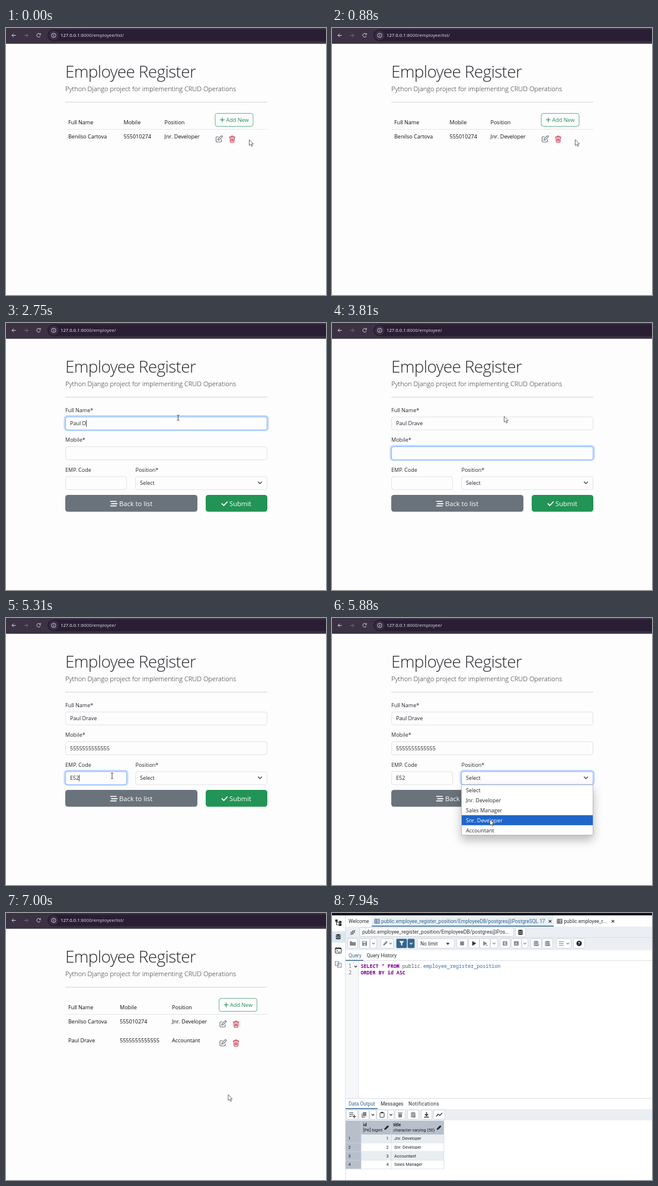
An HTML page for the animation above (8000 ms loop, 540 by 452 pixels).

```html
<!DOCTYPE html>
<html lang="en">
<head>
<meta charset="utf-8">
<title>Employee Register</title>
<style>
html, body { margin: 0; width: 100%; height: 100%; overflow: hidden; background: #fefdfe }
svg { display: block; width: 540px; height: 452px; white-space: pre }
.ui { font-family: "Open Sans", "Noto Sans", sans-serif }
.db { font-family: Roboto, "Liberation Sans", sans-serif }
.code { font-family: "Noto Sans Mono", "DejaVu Sans Mono", monospace }
.menu { filter: drop-shadow(0 8px 8px #0004) }
</style>
</head>
<body>
<svg id="stage" viewBox="0 0 540 452"></svg>
<script>
const LOOP = 8000;
const FORM_AT = 1440, LIST_AT = 6800, DB_AT = 7940;
const OPEN_AT = 5600, PICK_AT = 6310;
const INK = '#24272b', BLACK = '#0c0d0f', GREEN = '#229455', GREY = '#6a737b', BLUE = '#326690';
const NAME = 'Paul Drave', PHONE = '5555555555555';
const OPTIONS = ['Select', 'Jnr. Developer', 'Sales Manager', 'Snr. Developer', 'Accountant'];

// Pointer hot spot: time, x, y
const POINTER = [
  [0, 410.5, 189], [880, 410.5, 189], [1200, 388, 161], [1600, 388, 161],
  [2100, 290.5, 166], [2500, 290.5, 166], [2900, 290.5, 158], [4050, 290.5, 158],
  [4540, 179, 267], [5330, 179, 267], [5560, 262, 271], [5640, 262, 271],
  [5850, 266.5, 341], [5960, 266.5, 341], [6140, 266, 359], [6340, 266, 359],
  [6640, 375, 307.5], [7300, 375, 307.5], [7880, 360, 393], [8000, 360, 393]
];

// Text fields: box, label, value, focus span, first key and key interval
const FIELDS = [
  { x: 100, y: 158.5, w: 341, label: 'Full Name*', value: NAME, on: 2200, off: 3250, key: 2330, step: 80 },
  { x: 100, y: 209, w: 341, label: 'Mobile*', value: PHONE, on: 3250, off: 4580, key: 3930, step: 38 },
  { x: 100, y: 259.5, w: 104, label: 'EMP. Code', value: 'E52', on: 4580, off: OPEN_AT, key: 4820, step: 160 }
];

const stage = document.getElementById('stage');
const ruler = document.createElement('canvas').getContext('2d');
ruler.font = '9px "Open Sans", "Noto Sans", sans-serif';

const clamp = (v, a, b) => Math.min(b, Math.max(a, v));
const rect = (x, y, w, h, fill, more = '') =>
  `<rect x="${x}" y="${y}" width="${w}" height="${h}" fill="${fill}" ${more}/>`;
const text = (x, y, s, size = 9, fill = INK, more = '') =>
  `<text x="${x}" y="${y}" font-size="${size}" fill="${fill}" ${more}>${s}</text>`;
const line = (d, color, width = 1, more = '') =>
  `<path d="${d}" fill="none" stroke="${color}" stroke-width="${width}" ${more}/>`;
const shape = (d, fill) => `<path d="${d}" fill="${fill}"/>`;
const at = (x, y, s) => `<g transform="translate(${x} ${y})">${s}</g>`;
const group = (cls, s) => `<g class="${cls}">${s}</g>`;
const ROUND = 'stroke-linecap="round" stroke-linejoin="round"';

function pointerAt(t) {
  const i = POINTER.findIndex(p => p[0] > t);
  const [t0, x0, y0] = POINTER[i - 1], [t1, x1, y1] = POINTER[i];
  const u = (t - t0) / (t1 - t0), k = u * u * (3 - 2 * u);
  return { x: x0 + (x1 - x0) * k, y: y0 + (y1 - y0) * k };
}
const inside = (p, x, y, w, h) => p.x >= x && p.x <= x + w && p.y >= y && p.y <= y + h;

function drawPointer(p, kind) {
  const kinds = {
    arrow: '<path d="M0 0v10l2.3-2.1 1.7 3.5 1.5-.7-1.6-3.4h3.1z" fill="#fff" stroke="#3a3a3a" stroke-width=".75"/>',
    beam: line('M-2-4.5H-.5L0-4 .5-4.5H2M0-4V4M-2 4.5H-.5L0 4 .5 4.5H2', '#333', .9),
    hand: '<path d="M-1 0q1-1 2 0v4l4 1q1 .4 1 1.6l-.8 4.4h-5L-3.5 7q0-1.4 1.2-1L-1 7z" fill="#fff" stroke="#3a3a3a" stroke-width=".75"/>'
  };
  return at(p.x.toFixed(2), p.y.toFixed(2), kinds[kind]);
}

function browser(path) {
  return rect(0, 0, 540, 452, '#fefdfe') + rect(0, 0, 540, 26.7, '#3b3243') +
    rect(70, 2.5, 490, 20, '#291e34', 'rx="10"') +
    line('M16.5 12.5H10M13 9.5L10 12.5 13 15.5', '#d9d5dd') +
    line('M30.5 12.5H37M34 9.5l3 3-3 3', '#766e7d') +
    line('M57.6 10.5a3.1 3.1 0 1 0 .4 2.8M58.2 8.8v2.3H56', '#d9d5dd') +
    '<circle cx="80.5" cy="12.5" r="8" fill="#3a3045"/>' +
    '<circle cx="80.5" cy="12.5" r="3.6" fill="none" stroke="#dcd8e0" stroke-width=".9"/>' +
    line('M80.5 12v2.4M80.5 10.3v1', '#dcd8e0', .9) +
    text(92, 15.3, `127.0.0.1<tspan fill="#dedae2">:8000${path}</tspan>`, 7.75, '#fff') +
    text(100, 84, 'Employee Register', 28, INK, 'font-weight="300" letter-spacing="-.67"') +
    text(100, 107, 'Python Django project for implementing CRUD Operations', 11.05, INK, 'font-weight="300"') +
    rect(100, 125, 341, 1, '#d0d0d3');
}

function listPage(rows, [mobileX, positionX, addX], p) {
  const hot = inside(p, addX, 144, 65, 22);
  const ink = hot ? '#fff' : '#2b8a5c';
  let s = browser('/employee/list/') +
    text(105, 163, 'Full Name', 9, BLACK) + text(mobileX, 163, 'Mobile', 9, BLACK) +
    text(positionX, 163, 'Position', 9, BLACK) +
    rect(100, 171, 341, 1, '#e4e6e9') +
    rect(addX + .5, 144.5, 64, 22, hot ? GREEN : 'none', `rx="3.5" stroke="${GREEN}" stroke-width=".7"`) +
    line(`M${addX + 9} 155.5h7m-3.5-3.5v7`, ink, 1.2, ROUND) +
    text(addX + 19, 159, 'Add New', 9.1, ink);
  rows.forEach(([name, phone, job], i) => {
    const y = 187 + i * 32;
    s += text(105, y, name, 9, BLACK) + text(mobileX, y, phone, 9, BLACK) + text(positionX, y, job, 9, BLACK) +
      at(addX + 1, y - 5,
        line('M5 2H2.5Q1 2 1 3.5v6Q1 11 2.5 11h6q1.5 0 1.5-1.5V7M4 8l.6-2.3L9.6.7q.9-.7 1.7 0 .8.9.1 1.7L6.4 7.4z', GREY, 1.2, ROUND)) +
      at(addX + .4, y - 5,
        line('M24 2.6h9.6M26.6 2.4L27.5.8h2.6l.9 1.6M25 3l.5 7.5q.1 1.2 1.3 1.2h4q1.2 0 1.3-1.2L32.6 3M27.2 5v4.6M28.8 5v4.6M30.4 5v4.6', '#c93a50', 1.1, ROUND));
  });
  return s;
}

const glow = (x, y, w, k) => k <= 0 ? '' :
  rect(x, y, w, 22, 'none', `rx="3.5" stroke="#0d6efd" stroke-opacity="${.25 * k}" stroke-width="5"`);
const box = (x, y, w, k) => glow(x, y, w, k) +
  rect(x + .5, y + .5, w - 1, 22, '#fefdfe', `rx="3.5" stroke="${k > 0 ? '#86b7fe' : '#dfe2e6'}"`);

function field(f, t) {
  const count = clamp(Math.floor((t - f.key) / f.step) + 1, 0, f.value.length);
  const focused = t >= f.on && t < f.off;
  const typed = f.value.slice(0, count);
  const k = focused ? clamp((t - f.on) / 150, 0, 1) : 0;
  const last = count ? f.key + (count - 1) * f.step : f.on;
  let s = text(f.x, f.y - 8, f.label) + box(f.x, f.y, f.w, k) + text(f.x + 8, f.y + 14.5, typed);
  if (focused && (t - last) % 1060 < 530)
    s += rect(f.x + 8 + ruler.measureText(typed).width, f.y + 6, .8, 11, '#222');
  return s;
}

function formPage(t, p) {
  const open = t >= OPEN_AT && t < PICK_AT;
  const hotBack = !open && inside(p, 100, 291, 223, 29);
  const hotSend = inside(p, 337, 291, 104, 29);
  let s = browser('/employee/') + FIELDS.map(f => field(f, t)).join('') +
    text(218.5, 251.5, 'Position*') + box(218, 259.5, 223, clamp((t - OPEN_AT) / 150, 0, 1)) +
    text(226, 274, OPTIONS[t < PICK_AT ? 0 : 4]) +
    line('M425.5 269l3 3 3-3', '#343a40', 1.2, ROUND) +
    rect(100, 291, 223, 28.5, hotBack ? '#5c636a' : GREY, 'rx="4.5"') +
    line('M176.5 302h9.5M178 305.8h9.5M176.5 309.6h9.5', '#fff', 1.7, ROUND) +
    text(191, 309.8, 'Back to list', 11.2, '#fff') +
    rect(337, 291, 104, 28.5, hotSend ? '#157347' : GREEN, 'rx="4.5"') +
    line('M364.5 306l3 3 5.8-6.2', '#fff', 1.8, ROUND) +
    text(377, 309.8, 'Submit', 11.2, '#fff');
  if (open) {
    const hot = clamp(Math.floor((p.y - 282.5) / 17), 0, 4);
    s += rect(218.5, 282.5, 222, 85, '#fff', 'rx="2" stroke="#b4b6ba" class="menu"') +
      rect(219, 282.8 + hot * 17, 221, 17, '#2065c9') +
      OPTIONS.map((o, i) => text(226, 294.7 + i * 17, o, 9, i === hot ? '#fff' : INK)).join('');
  }
  return s;
}

// Database tool
const DARK = '#2c3136', DIM = '#81878f', EDGE = '#c5cad2';
const button = (x, y, w, icon = '', fill = '#fff') =>
  rect(x + .5, y + .5, w - 1, 16, fill, `rx="2" stroke="${EDGE}" stroke-width=".7"`) + at(x + w / 2, y + 8.5, icon);
const down = (color = DARK) => line('M-2.2-1L0 1.2 2.2-1', color, 1.1);
const cylinder = color => shape('M-4-3q4-2.4 8 0v6.4q-4 2.4-8 0z', color) + line('M-4-1.6q4 2 8 0M-4 1.2q4 2 8 0', '#fff', .8);
const pencil = color => shape('M-3.8 3.8l.7-2.8L2-4 4-2-1.1 3.1z', color);
const grid = color => line('M-4-3.5h8v7h-8zM-4-1h8M-4 1.3h8M-1-3.5v7', color, .9);
const cross = line('M-2.2-2.2l4.4 4.4m0-4.4l-4.4 4.4', DARK, 1.2);
const play = color => shape('M-2.8-4L3.8 0l-6.6 4z', color);
const bars = (color, w = 1.1) => line('M-4-3h8M-4 0h8M-4 3h8', color, w);

function databasePage() {
  const top = rect(0, 0, 540, 452, '#fff') + rect(0, 0, 540, 4, '#150d1a') +
    rect(0, 31, 22, 19, '#dce8f1') + rect(22, 4, 1, 448, '#dde0e6') +
    at(10.5, 16, shape('M-5-5h4v4h-4zM1-2.5h4.5v4H1zM1 2h4.5v4H1z', DARK) + line('M-3-2v6h4M-3 0h4', DARK)) +
    at(10.5, 40, cylinder(DARK)) +
    at(10.5, 63.5, rect(-5, -4.5, 10, 9, 'none', `stroke="${DARK}" rx="1"`) + rect(-5, -4.5, 10, 2, DARK) + line('M-3-1l2 1.5-2 1.5M0 2.5h3', DARK)) +
    at(10.5, 87, line('M-5-5h6v7h-6zM-1-2h6v7h-6z', DIM, 1.1)) +
    rect(67, 4, 307, 18, '#e9f0f6') + rect(67, 21.5, 307, 1.5, BLUE) +
    text(28, 16.5, 'Welcome', 8.3, DARK) + at(76, 14, grid(BLUE)) +
    text(83, 16.5, 'public.employee_register_position/EmployeeDB/postgres@PostgreSQL 17', 8.38, BLUE) +
    at(368, 14, cross) + at(384, 14, grid(DARK)) +
    text(391.5, 16.5, 'public.employee_r...', 8.2, DARK) + at(474, 14, cross);

  const tools = rect(23, 23, 517, 40, '#ebeef3') + rect(23, 41, 517, 1, '#dce0e6') +
    at(35, 33, line('M-4 4l2-2M2-2l2-2M-2-1l3 3q-2 2-3.6.3T-2-1zM-1-2l3 3q2-2 .5-3.5T-1-2z', DARK, 1)) +
    rect(46.5, 25, 260, 14.5, '#fff', `rx="2" stroke="${EDGE}" stroke-width=".7"`) +
    text(51, 35.3, 'public.employee_register_position/EmployeeDB/postgres@Pos...', 8.6, DARK) +
    button(309, 24, 18, cylinder(DARK)) +
    button(26, 43, 18, shape('M-5-3.5h3.5l1 1.2H5v6H-5z', DIM)) +
    button(46, 43, 18, rect(-4, -4, 8, 8, DIM, 'rx="1"') + rect(-2.5, -3, 4.5, 2, '#fff') + '<circle cy="2" r="1.2" fill="#fff"/>') +
    button(64, 43, 12, down(DIM)) +
    button(82, 43, 22, at(-3, 0, pencil(DIM)) + at(6, 0, down(DIM))) +
    button(108, 43, 19, shape('M-4-4h8L1 0v4l-2-1.2V0z', '#fff'), BLUE) + button(127, 43, 13, down('#fff'), BLUE) +
    button(144, 43, 63) + text(149, 55, 'No limit', 8.5, DARK) + at(195.5, 52, shape('M-3-1.5h6L0 2z', DARK)) +
    button(210, 43, 19, rect(-3.3, -3.3, 6.6, 6.6, DIM)) + button(230, 43, 19, play(DARK)) +
    button(249, 43, 18, play(DIM) + line('M1 3h4', DIM)) + button(267, 43, 13, down(DIM)) +
    button(283, 43, 18, rect(-3.7, -3.7, 7.4, 7.4, DIM, 'rx="1"') + line('M2-2h-3v4h3M-1 0h2.5', '#fff', .9)) +
    button(302, 43, 18, rect(-4, -3.7, 8, 7.4, DIM, 'rx="1"') + line('M-2 2v-2M0 2v-4M2 2V1', '#fff')) + button(320, 43, 11, down(DIM)) +
    button(335, 43, 19, cylinder(DIM) + line('M1 3l1.5 1.5L5 1.5', DIM)) +
    button(354, 43, 19, cylinder(DIM) + line('M1 1l3.5 3.5M4.5 1L1 4.5', DIM)) +
    button(378, 43, 26, at(-4, 0, bars(DIM)) + at(7, 0, down(DIM))) +
    button(407, 43, 20, '<circle r="4.5" fill="#222"/>' + text(-1.9, 2.6, '?', 7.5, '#fff', 'font-weight="700"'));

  const word = (s, color, bold) => `<tspan fill="${color}"${bold ? ' font-weight="700"' : ''}>${s}</tspan>`;
  const key = s => word(s, '#770088', true);
  const editor = text(28, 75, 'Query', 8.4, BLUE) + text(58.5, 75, 'Query History', 8.4, DARK) +
    rect(23, 80, 517, 1, '#dde0e6') + rect(23, 79.5, 30, 1.5, BLUE) +
    rect(23, 81, 22, 233, '#f6f7f9') + rect(44.5, 81, .8, 233, '#dde0e6') +
    at(40, 90.5, down()) +
    group('code', text(28, 92.5, '1', 8.37, '#777') + text(28, 104, '2', 8.37, '#777') +
      text(48.5, 92.5, key('SELECT') + word(' * ', '#770088') + key('FROM') +
        word(' public', '#555a60') + word('.employee_register_position', '#2d6fae'), 8.37) +
      text(48.5, 104, key('ORDER BY id ASC'), 8.37));

  const output = rect(23, 313.5, 517, 1, '#d5d9e0') +
    text(28, 325.5, 'Data Output', 8.4, BLUE) + text(82, 325.5, 'Messages', 8.4, DARK) +
    text(129, 325.5, 'Notifications', 8.4, DARK, 'letter-spacing=".3"') +
    rect(23, 332, 517, 19, '#ebeef3') + rect(23, 330.5, 54, 1.5, BLUE) +
    button(24, 333, 20, line('M-5-3h7M-5 0h7M-5 3h4M3.5 0v6M.5 3h6', DARK, 1.2)) +
    button(45, 333, 18, shape('M-2-4.5h6v7h-6zM-4-2h1.4v5.4H2V5h-6z', DIM)) + button(63, 333, 12, down()) +
    button(75, 333, 19, rect(-3.5, -3.5, 7, 8, 'none', `stroke="${DARK}" rx="1"`) + rect(-1.8, -4.8, 3.6, 2.4, DARK)) +
    button(94, 333, 11, down()) +
    button(106, 333, 18, shape('M-3-2h6v6.5h-6zM-4-4h8v1.3h-8z', DIM)) +
    button(127, 333, 20, cylinder(DIM) + line('M2 0v5M0 3l2 2 2-2', DIM)) +
    button(150, 333, 19, line('M0-4.5v6M-2.7-1L0 1.7 2.7-1M-4 4h8', DARK, 1.5)) +
    button(171, 333, 20, line('M-5 3l3-4 3 2.2L5-3', DARK, 1.3));

  const titles = ['Jnr. Developer', 'Snr. Developer', 'Accountant', 'Sales Manager'];
  const H = 14.6;
  const table = rect(23, 351.5, 166, 23.5, '#b7bfcb') +
    text(52.5, 361, 'id', 7.2, '#1e2226', 'font-weight="700"') + text(52.5, 370, '[PK] bigint', 7.2, '#1e2226') +
    text(103.5, 361, 'title', 7.2, '#1e2226', 'font-weight="700"') + text(103.5, 370, 'character varying (50)', 7.2, '#1e2226') +
    at(92, 363.5, pencil('#1e2226')) + at(180.5, 363.5, pencil('#1e2226')) +
    titles.map((title, i) => {
      const y = 375 + i * H;
      return rect(23, y, 26, H, '#b7bfcb') + rect(49, y, 140, H, i % 2 ? '#fff' : '#e8edf1') +
        rect(23, y + H - .7, 166, .7, '#d3d8df') +
        text(27.5, y + 9.4, i + 1, 7.2) + text(95.5, y + 9.4, i + 1, 7.2, INK, 'text-anchor="end"') +
        text(105, y + 9.4, title, 7.2);
    }).join('') +
    line('M49.2 351.5v82M99.8 351.5v82M188.8 351.5v82', '#d3d8df', .8);

  return group('db', top + tools + editor + output + table);
}

function scene(t) {
  if (t >= DB_AT) return databasePage();
  const p = pointerAt(t);
  const first = ['Benilso Cartova', '555010274', 'Jnr. Developer'];
  let page, kind = 'arrow';
  if (t < FORM_AT) {
    page = listPage([first], [198.5, 267.5, 352.5], p);
    if (inside(p, 352, 144, 65, 22)) kind = 'hand';
  } else if (t < LIST_AT) {
    page = formPage(t, p);
    const open = t >= OPEN_AT && t < PICK_AT;
    if (!open && FIELDS.some(f => inside(p, f.x, f.y, f.w, 22))) kind = 'beam';
    else if (!open && (inside(p, 337, 291, 104, 29) || inside(p, 100, 291, 223, 29))) kind = 'hand';
  } else {
    page = listPage([first, [NAME, PHONE, 'Accountant']], [192, 280, 359], p);
  }
  return group('ui', page + drawPointer(p, kind));
}

let shown = '';
function tick() {
  const next = scene(performance.now() % LOOP);
  if (next !== shown) stage.innerHTML = shown = next;
  requestAnimationFrame(tick);
}
tick();
</script>
</body>
</html>
```
